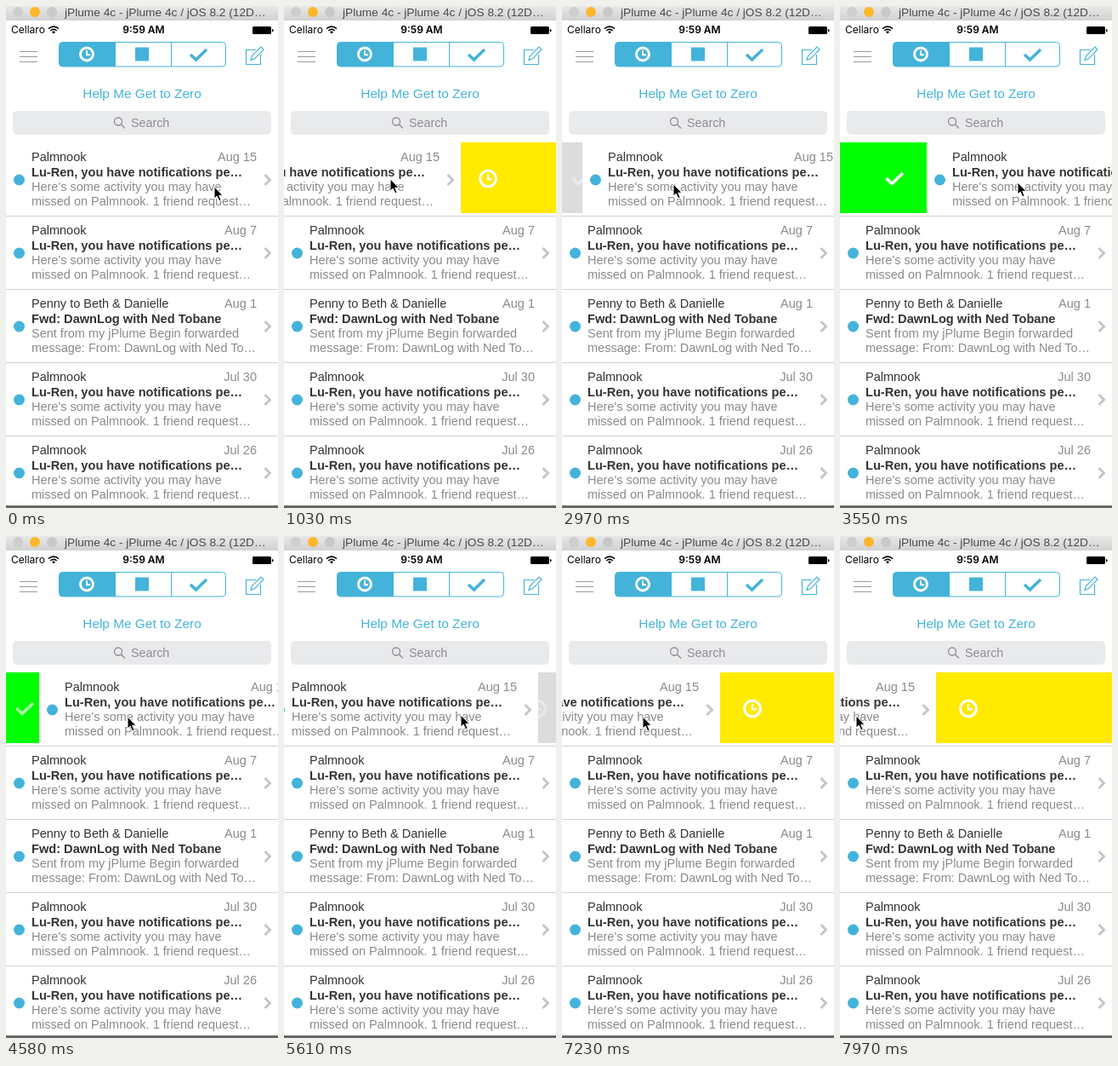
Animation of 320 by 589 pixels, one loop 8000 ms. Source, as an HTML page:

```html
<!DOCTYPE html>
<html lang="en">
<head>
<meta charset="utf-8">
<title>Inbox swipe</title>
<style>
  html, body { margin: 0; width: 100%; height: 100%; overflow: hidden; background: #fff; }
  svg { display: block; width: 320px; height: 589px; font: 14.5px "Liberation Sans", Arial, sans-serif; }
  .line { fill: none; stroke: #44b3da; }
  .blue { fill: #44b3da; }
  .from { fill: #333; }
  .subject { fill: #333; font-weight: 700; font-size: 14.6px; }
  .soft { fill: #8a8a8a; }
  .status { font: 12px Inter, sans-serif; }
  .chevron { fill: none; stroke: #c4c4c8; stroke-width: 2.8; }
  .white { fill: none; stroke: #fff; stroke-width: 3; }
</style>
</head>
<body>
<svg viewBox="0 0 320 589">
  <defs>
    <linearGradient id="bar" x2="0" y2="1">
      <stop stop-color="#e9e8e9"/><stop offset="1" stop-color="#d2d1d2"/>
    </linearGradient>
    <clipPath id="cellClip"><rect y="160" width="320" height="83"/></clipPath>
  </defs>
  <rect width="320" height="589" fill="#fff"/>

  <rect width="320" height="17" fill="url(#bar)"/>
  <circle cx="14" cy="7" r="6" fill="#cfcecf"/>
  <circle cx="34" cy="7" r="6" fill="#fdb72c"/>
  <circle cx="54" cy="7" r="6" fill="#c9c8c9"/>
  <text x="69" y="12" font-size="13.7" fill="#4a4a4a">jPlume 4c - jPlume 4c / jOS 8.2 (12D…</text>

  <text class="status" x="6" y="32">Cellaro</text>
  <g fill="none" stroke="#000" stroke-width="1.5">
    <path d="M50 26.6Q56 21.6 62 26.6M52.2 29Q56 25.8 59.8 29"/>
    <path d="M54 30.4Q56 28.8 58 30.4L56 32.6Z" fill="#000" stroke="none"/>
  </g>
  <text class="status" x="162" y="32" text-anchor="middle" font-weight="600" style="font-weight:600">9:59 AM</text>
  <rect x="290" y="24" width="22" height="9" rx="1.5"/>
  <path d="M313 27a1.6 1.6 0 0 1 0 3.4z"/>

  <path d="M16 53.5H37M16 59.5H37M16 65.5H37" stroke="#999"/>
  <path class="blue" d="M128.5 42.5H66.5a4 4 0 0 0-4 4V67a4 4 0 0 0 4 4H128.5Z"/>
  <rect class="line" x="62.5" y="42.5" width="196" height="28.5" rx="4"/>
  <path class="line" d="M128.5 42.5V71M194.5 42.5V71"/>
  <g class="white"><circle cx="95" cy="56.5" r="7.5"/><path d="M95 52V57.2H99" stroke-width="2"/></g>
  <rect class="blue" x="152" y="48.500" width="16" height="16"/>
  <path class="line" d="M217 57L223.500 63L236 51" stroke-width="3.6"/>
  <path class="line" d="M294 51.500H282.500V68.500H299.500V57M288 63.500L289.500 58.500L300 48L303 51L292.500 61.800Z" stroke-width="1.2"/>

  <text class="blue" x="160" y="108" text-anchor="middle" font-size="15.4">Help Me Get to Zero</text>
  <rect x="8" y="123" width="304" height="28" rx="5" fill="#e9eaeb"/>
  <g fill="none" stroke="#8e8e93" stroke-width="1.3"><circle cx="132" cy="135.500" r="4.500"/><path d="M135.300 138.800L140 143.500"/></g>
  <text x="147" y="142" font-size="14.3" fill="#8e8e93">Search</text>

  <g clip-path="url(#cellClip)">
    <rect id="back" y="160" width="320" height="83"/>
    <path id="check" class="white" d="M-9.500 0L-3 6.500L10 -6" style="stroke-width:3.600"/>
    <g id="clock" class="white"><circle r="9.300"/><path d="M0 -5.500V.8H5" stroke-width="2.400"/></g>
    <g id="cell"><rect y="160" width="320" height="83" fill="#fff"/></g>
  </g>
  <g id="list"></g>
  <rect y="586" width="320" height="3" fill="#666"/>
  <path id="cursor" d="M0 0V14L3.200 11.200L5.700 16.800L8.100 15.800L5.700 10.300H10Z" stroke="#fff" stroke-width="1"/>
</svg>
<script>
const el = id => document.getElementById(id);

const notice = date => ["Palmnook", date, "Lu-Ren, you have notifications pe…",
  "Here's some activity you may have", "missed on Palmnook. 1 friend request…"];
const mails = [
  notice("Aug 15"),
  notice("Aug 7"),
  ["Penny to Beth &amp; Danielle", "Aug 1", "Fwd: DawnLog with Ned Tobane",
    "Sent from my jPlume Begin forwarded", "message: From: DawnLog with Ned To…"],
  notice("Jul 30"),
  notice("Jul 26")
];

const row = ([from, date, subject, a, b], y) => `<g transform="translate(0 ${y})">
  <circle class="blue" cx="15.500" cy="44" r="6.500"/>
  <text class="from" x="30" y="22">${from}</text>
  <text class="soft" x="295" y="22" text-anchor="end">${date}</text>
  <text class="subject" x="30" y="40">${subject}</text>
  <text class="soft" x="30" y="57">${a}</text>
  <text class="soft" x="30" y="74">${b}</text>
  <path class="chevron" d="M304.500 38L310.500 44L304.500 50"/></g>`;

mails.forEach((mail, i) => {
  const y = 160 + 86 * i;
  el(i ? "list" : "cell").insertAdjacentHTML("beforeend", row(mail, y));
  if (i < 4) el("list").insertAdjacentHTML("beforeend",
    `<rect y="${y + 86}" width="320" height="1" fill="#d2d2d4"/>`);
});

// step, pointer x, pointer y, cell offset
const keys = [
  [0, 245, 212, 0], [2, 228, 210, -8], [6, 131, 204, -106], [7, 125, 203, -112],
  [9, 125, 203, -112], [15, 237, 210, -2], [16, 238, 210, 0], [18, 106, 210, 0],
  [19, 111, 209, 4], [24, 209, 207, 102], [26, 237, 207, 130], [27, 237, 207, 130],
  [31, 143, 212, 39], [33, 104, 212, 0], [36, 232, 210, 0], [37, 225, 210, -4],
  [43, 121, 212, -108], [44, 107, 212, -122], [46, 96, 212, -133], [47, 96, 212, -133],
  [48, 94, 212, -135], [50, 95, 212, -134], [54, 19, 211, -207]
];
const LOOP = 8000, STEP = 147.6, REVEAL = 60, TINT = 30;

function pose(step) {
  const i = keys.findIndex(k => k[0] >= step);
  if (i < 1) return keys[i < 0 ? keys.length - 1 : 0].slice(1);
  const a = keys[i - 1], b = keys[i], p = (step - a[0]) / (b[0] - a[0]);
  return [1, 2, 3].map(j => Math.round(a[j] + (b[j] - a[j]) * p));
}

const move = (id, x, y) => el(id).setAttribute("transform", `translate(${x} ${y})`);

function draw(now) {
  const step = Math.floor((now % LOOP + 8) / STEP);
  const [x, y, off] = pose(step);
  const gap = step < 10 ? 32 : 38;
  const alpha = Math.min(1, Math.abs(off) / REVEAL);

  move("cell", off, 0);
  move("cursor", x, y);
  move("check", Math.max(22, off - 38), 202);
  move("clock", Math.min(298, 320 + off + gap), 202.5);
  el("check").style.opacity = off > 0 ? alpha : 0;
  el("clock").style.opacity = off < 0 ? alpha : 0;
  el("back").setAttribute("fill", Math.abs(off) < TINT ? "#dcdcdc" : off > 0 ? "#0f0" : "#ffea00");
}

const start = performance.now();
(function tick() {
  draw(performance.now() - start);
  requestAnimationFrame(tick);
})();
</script>
</body>
</html>
```
